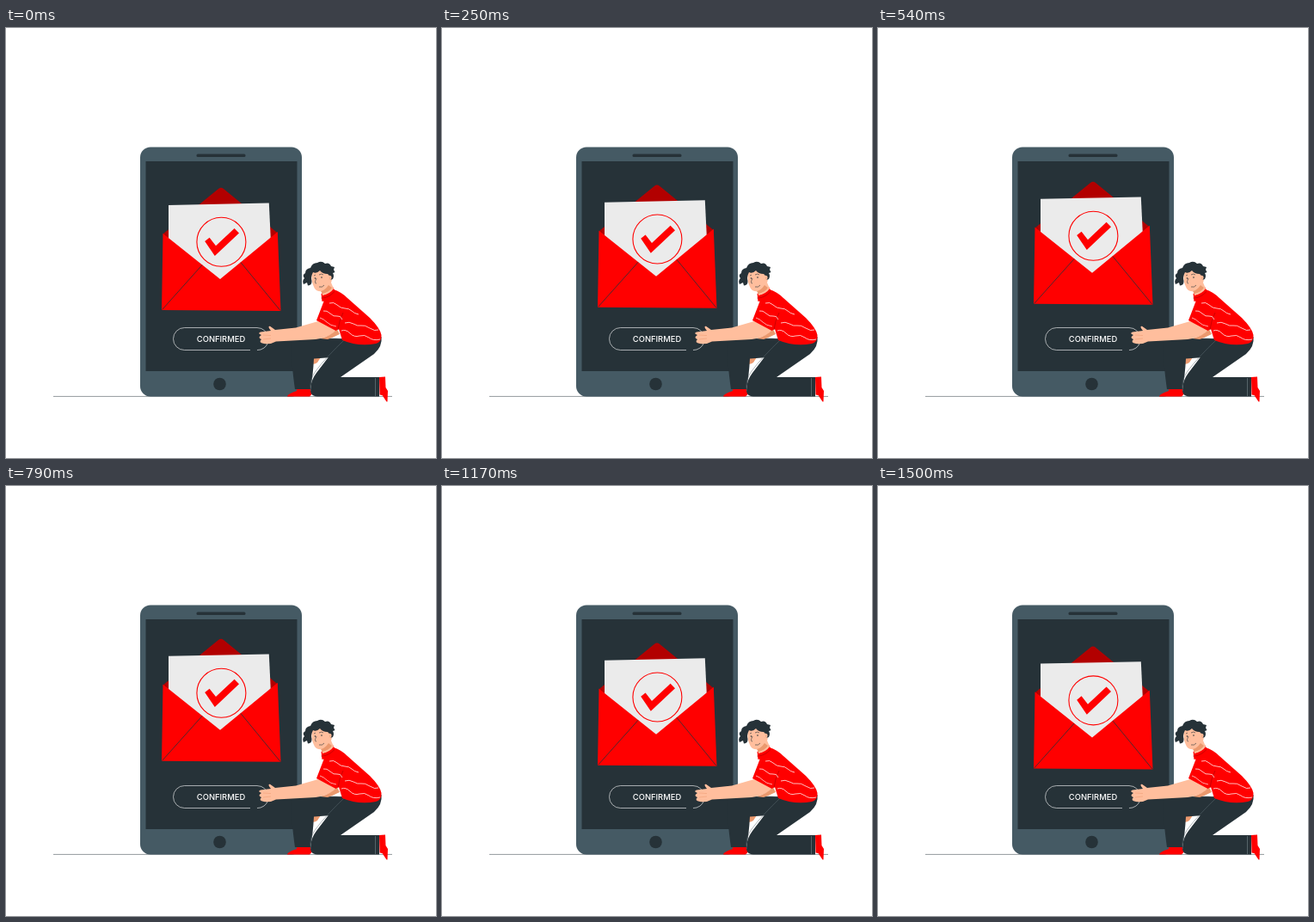
An HTML page with a canvas that plays this animation: 500 by 500 pixels, repeating every 1540 ms.

```html
<!DOCTYPE html>
<html lang="en">
<head>
<meta charset="utf-8">
<title>Confirmed</title>
<style>
  html, body { margin: 0; width: 100%; height: 100%; overflow: hidden; background: #fff; }
  canvas { display: block; width: 500px; height: 500px; }
</style>
</head>
<body>
<canvas id="stage" width="500" height="500"></canvas>
<script>
const ctx = document.getElementById('stage').getContext('2d');

const LOOP = 1540;
const STEP = 1000 / 24;
const RISE = 10;
const RED = '#ff0000', DARK_RED = '#b20000', DARK = '#263238', STEEL = '#455a64';
const PAPER = '#ebebeb', SKIN = '#ffbe9d', SHADE = '#eb996e', WHITE = '#fff';

function fill(path, color) {
  ctx.fillStyle = color;
  ctx.fill(new Path2D(path));
}

function line(path, color, width) {
  ctx.strokeStyle = color;
  ctx.lineWidth = width;
  ctx.stroke(new Path2D(path));
}

function roundBox(x, y, w, h, r, color) {
  ctx.beginPath();
  ctx.roundRect(x, y, w, h, r);
  ctx.fillStyle = color;
  ctx.fill();
}

function circle(x, y, r) {
  ctx.beginPath();
  ctx.arc(x, y, r, 0, Math.PI * 2);
}

function drawPhone() {
  line('M55 428.400H449', DARK, 0.5);
  roundBox(156, 138.5, 188, 290, 12, STEEL);
  roundBox(162.5, 155, 176, 244, 0, DARK);
  roundBox(221.5, 146.5, 57, 3.5, 1.5, DARK);
  circle(248.5, 414, 7.3);
  ctx.fillStyle = DARK;
  ctx.fill();
}

function drawButton() {
  line('M284 374.5H207.5A13 13 0 0 1 207.5 348.5H292A13 13 0 0 1 305 361.5Q305 371 296 374L292 374.5', WHITE, 0.6);
  ctx.fillStyle = WHITE;
  ctx.font = '500 9.4px Inter, "Open Sans", sans-serif';
  ctx.textAlign = 'center';
  ctx.fillText('CONFIRMED', 250, 365);
}

function drawEnvelope(lift) {
  ctx.save();
  ctx.translate(0, 0.4 - lift);
  fill('M182.500 240L247 187.500Q250 185 253 187.500L316 239L300 290H200Z', DARK_RED);
  fill('M189 206.300L305.800 204L308 250L249 294L189 250Z', PAPER);

  circle(250.4, 249.2, 28.5);
  ctx.strokeStyle = RED;
  ctx.lineWidth = 1.1;
  ctx.stroke();
  fill('M231.200 248.500L236.600 244.200L244 253.600L265.600 233.300L271 238.800L242.800 265.500Z', RED);

  fill('M182.500 239.300L249 292.300L315.800 237.300L319.500 329.300L181 328.300Z', RED);
  line('M181.500 328L228 276M319 329L273 273', DARK, 0.8);
  ctx.restore();
}

function drawLegs() {
  // far hand between the legs
  fill('M358 381L368 380L362 389Q358 392 355.500 390Z', SHADE);

  fill('M338 420L354 419L355.500 426L353 428.500H327Q327 425.500 338 422Z', RED);
  fill('M338 361H400L392 382L358 384.500Q357 404 354 420H336Q331 385 332.500 368Q333 361 338 361Z', DARK);
  fill('M434 406L441 405.500L441.500 418L444 422L443.500 434.500H442.500L437.500 427L434.500 426.500Z', RED);
  fill('M392 360L436.500 359Q438 370 428 379L389 406H434V428.500H362Q352 428 354.500 417Q355 409 361 401L374 384Z', DARK);
  line('M338 361H384L394 362Q372 383 360 399Q352 410 354.500 422', '#5d6b71', 0.5);
  line('M429.500 407V428', '#78868c', 0.6);
}

function drawBody() {
  fill('M363 341L337 348.500L313 351L307 346.800Q303.500 346.500 308 352L296 353.500Q292 355 297 357Q292 360 297 362Q293 366 300 367Q308 368 314 364.500L360 362Q371 360 379 356L386 350Z', SKIN);
  line('M299 357L308 357.500M299 362L308 361', SHADE, 0.5);
  fill('M366 361Q378 358 385 350L388 356Q380 360 374 362Z', SHADE);

  fill('M367 314Q375 312 381 304Q390 307 397 314L423 337Q435 349 436.500 357Q437 365 430 367Q410 371 391 363L387 350L383.500 352L361 340L369.500 318Z', RED);
  fill('M366.500 309L380 301L383 307Q376 316 367.500 318Z', RED);
  line('M366.500 314Q375 314 382 306.500', '#a90000', 0.6);
  line('M392 331Q387 341 386 351', '#a90000', 0.6);

  line('M376 320Q381 318 385 322T394 326T402 329T410 333', WHITE, 0.75);
  line('M369 329Q373 328 377 332T385 335T391 339', WHITE, 0.75);
  line('M394 343Q399 341 404 344T413 346T423 349T433 351', WHITE, 0.75);
  line('M390 352Q395 350 400 355T411 358T422 360T435 362', WHITE, 0.75);
  line('M365 337Q369 338 373 342T384 347', WHITE, 0.65);
}

function drawHead() {
  fill('M356 283L377 281Q380 292 378 296L381 303Q377 309 368 311L367 306Q360 307 358 301Q354 293 356 283Z', SKIN);
  fill('M375 299Q371 305 366 306L368 309Q376 307 379 302Z', SHADE);
  fill('M354 279Q356 273 362 273Q367 270 371 274Q376 272 378 277L382 278L381 281L382.500 284L380 285Q382 288 380 292L377 293Q377 288 374 286Q368 286 365 282Q361 286 357 284Q354 290 355.500 294Q356 299 351 299.500L350 296L346 298Q344 294 347 291Q344 287 348 285Q348 280 354 279Z', DARK);
  fill('M374.500 289Q376 286.500 378.500 289Q379 293.500 375 293.500Z', SKIN);
  line('M376 290Q378 289 376 292.500', SHADE, 0.5);
  line('M358 288L360 287M364 287Q367 285 369 287M361 291Q358 297 361 297M364 301Q368 302 370 299', DARK, 0.6);
  for (const [x, y] of [[359.5, 291], [367, 290]]) {
    circle(x, y, 0.8);
    ctx.fillStyle = DARK;
    ctx.fill();
  }
}

// Triangle wave sampled at 24 pictures a second, lowest near the loop's end.
function liftAt(time) {
  const tick = Math.floor((Math.floor(time / 10) * 10 + 4.9) / STEP);
  const phase = ((tick + 1.5) % 37) / 37;
  return RISE * (1 - Math.abs(1 - 2 * phase));
}

function draw(time) {
  ctx.fillStyle = WHITE;
  ctx.fillRect(0, 0, 500, 500);
  drawPhone();
  drawEnvelope(liftAt(time));
  drawButton();
  drawLegs();
  drawBody();
  drawHead();
}

const start = performance.now();
function tick(now) {
  draw(Math.max(0, now - start) % LOOP);
  requestAnimationFrame(tick);
}
draw(0);
requestAnimationFrame(tick);
</script>
</body>
</html>
```
